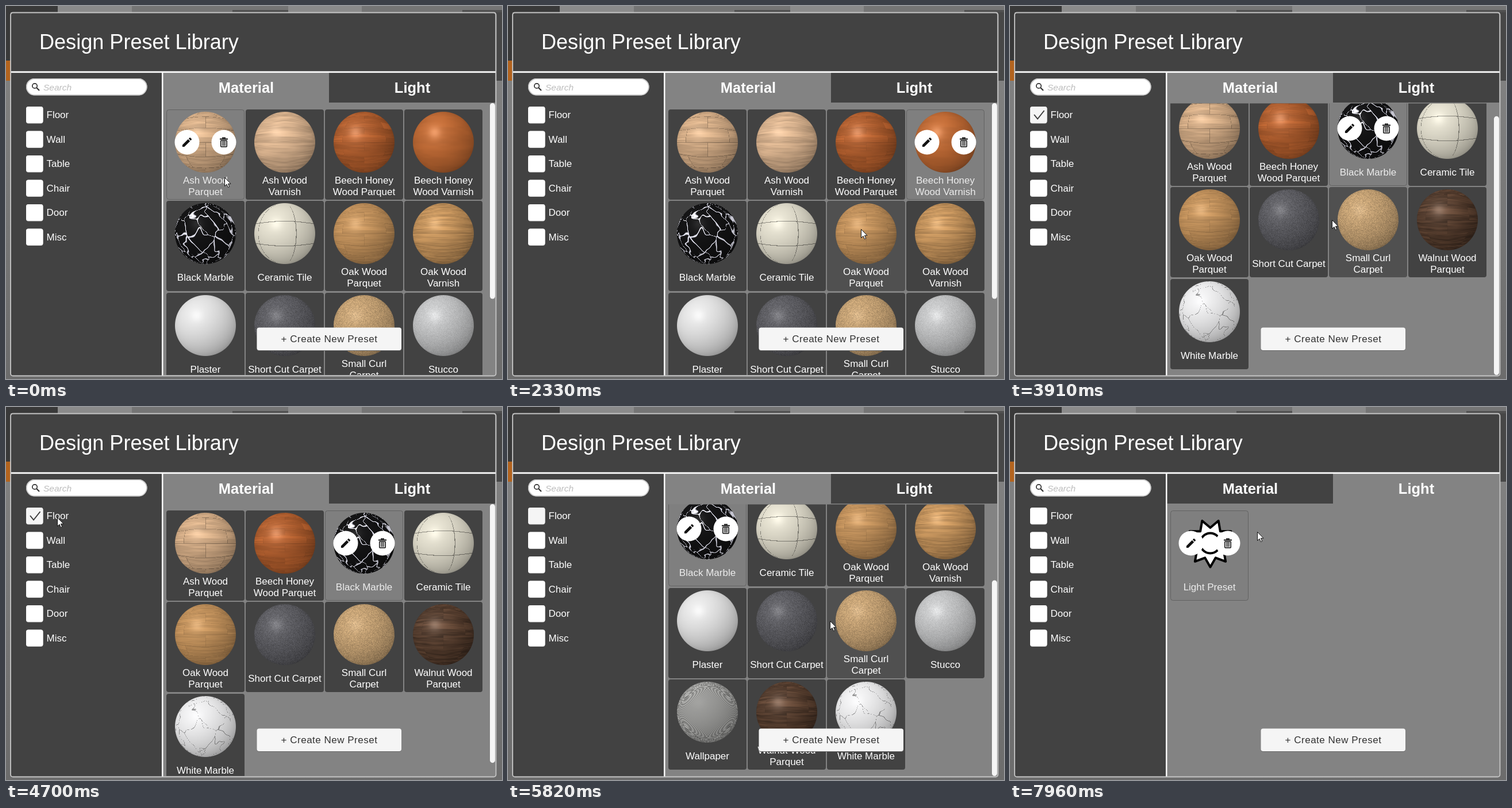
An HTML page with a canvas that plays this animation: 863 by 649 pixels, repeating every 8000 ms.

```html
<!DOCTYPE html>
<html lang="en">
<head>
<meta charset="utf-8">
<title>Design Preset Library</title>
<style>
  html, body { margin: 0; width: 100%; height: 100%; overflow: hidden; background: #747474; }
  canvas { display: block; }
</style>
</head>
<body>
<canvas id="stage" width="863" height="649"></canvas>
<script>
const g = document.getElementById('stage').getContext('2d');
const LOOP = 8000, R = 53, DARK = '#424242', HOVER = '#505050', GRAY = '#838383';
const SANS = '"Liberation Sans", Arial, sans-serif';
const clamp = (v, a = 0, b = 1) => Math.min(b, Math.max(a, v));
const mix = (a, b, f) => a + (b - a) * f;
const ramp = (t, from, to) => clamp((t - from) / (to - from));

// ---- procedural textures: brightness at longitude u, latitude v ----
const hash = (x, y) => { const s = Math.sin(x * 127.1 + y * 311.7) * 43758.5453; return s - Math.floor(s); };
function noise(x, y) {
  const i = Math.floor(x), j = Math.floor(y), soft = f => f * f * (3 - 2 * f);
  const a = soft(x - i), b = soft(y - j);
  return mix(mix(hash(i, j), hash(i + 1, j), a), mix(hash(i, j + 1), hash(i + 1, j + 1), a), b);
}
const plain = () => 1;
const grain = (amp, freq) => (u, v) =>
  1 + amp * (noise(u + 9, v * freq) - .5) + amp * .6 * (noise(u * 3, v * freq * 2.5) - .5);
const speckle = amp => (u, v, x, y) => 1 + amp * (hash(x, y) - .5);
const weave = (u, v) => 1 + .3 * Math.sin(u * 166) * Math.sin(v * 166);

function planks(base, height, tone, seam) {
  return (u, v) => {
    const row = Math.floor(v / height), along = u / 1.6 + (row & 1) / 2, block = Math.floor(along);
    const gap = Math.min((v / height - row) * height, (along - block) * 1.6);
    return base(u, v + block * 3) * (1 + tone * (hash(row, block) - .5)) * (gap < .02 ? seam : 1);
  };
}

function tiles(u, v) {
  const column = Math.abs(((u + 1.05) % 1.44 + 1.44) % 1.44 - .72);
  return column > .708 || Math.abs(Math.abs(v) - .42) < .012 ? .6 : 1;
}

// Cracks run along the borders between randomly placed cell centres.
function veins(freq, width, gain) {
  return (u, v) => {
    const x = u * freq + .5 * noise(u * 5, v * 5), y = (v - u * .35) * freq + .5 * noise(v * 5, u * 5 + 7);
    let near = 9, next = 9;
    for (let i = Math.floor(x) - 1; i <= x + 1; i++) for (let j = Math.floor(y) - 1; j <= y + 1; j++) {
      const d = Math.hypot(i + hash(i, j) - x, j + hash(j, i + 5) - y);
      if (d < near) { next = near; near = d; } else next = Math.min(next, d);
    }
    return 1 + gain * clamp(1.4 - (next - near) / (width * (.4 + 1.2 * noise(x * 2, y * 2))));
  };
}

function makeBall(hex, texture, gloss) {
  const size = 108, ball = document.createElement('canvas');
  ball.width = ball.height = size;
  const c = ball.getContext('2d'), img = c.createImageData(size, size);
  const rgb = [1, 3, 5].map(i => parseInt(hex.slice(i, i + 2), 16));
  for (let py = 0; py < size; py++) for (let px = 0; px < size; px++) {
    const dx = px + .5 - 54, dy = py + .5 - 54, r = Math.hypot(dx, dy);
    if (r > R + .5) continue;
    const x = clamp(dx / R, -1), y = clamp(dy / R, -1), z = Math.sqrt(Math.max(0, 1 - x * x - y * y));
    const u = Math.atan2(x, z), v = Math.asin(y) * (1 + .3 * x * x);
    const light = .79 + .25 * (-.4 * x - .5 * y + .77 * z);
    const spot = (dx + 15) ** 2 + (dy + 17) ** 2;
    const shine = gloss * (.7 * Math.exp(-spot / 110) + .3 * Math.exp(-spot / 900));
    const k = light * texture(u, v, px, py), at = (py * size + px) * 4;
    rgb.forEach((ch, i) => img.data[at + i] = ch * k + 255 * shine);
    img.data[at + 3] = 255 * clamp(R + .5 - r);
  }
  c.putImageData(img, 0, 0);
  return ball;
}

const material = (label, floor, ...look) => ({ lines: label.split('|'), floor, ball: makeBall(...look) });
const materials = [
  material('Ash Wood|Parquet', true, '#cca681', planks(grain(.16, 16), .5, .06, .75), .1),
  material('Ash Wood|Varnish', false, '#d0ab88', grain(.18, 14), .1),
  material('Beech Honey|Wood Parquet', true, '#aa592a', planks(grain(.12, 16), .26, .16, .95), .24),
  material('Beech Honey|Wood Varnish', false, '#b4622f', grain(.06, 5), .22),
  material('Black Marble', true, '#111112', veins(1.7, .07, 13), .1),
  material('Ceramic Tile', true, '#dad6c6', tiles, .12),
  material('Oak Wood|Parquet', true, '#b98a56', planks(grain(.14, 24), .4, .04, .92), .14),
  material('Oak Wood|Varnish', false, '#ba8b56', grain(.22, 24), .14),
  material('Plaster', false, '#dedede', plain, .08),
  material('Short Cut Carpet', true, '#58585d', speckle(.28), .16),
  material('Small Curl|Carpet', true, '#bd9b6f', speckle(.25), .1),
  material('Stucco', false, '#bcbdbe', speckle(.1), .14),
  material('Wallpaper', false, '#969694', weave, .03),
  material('Walnut Wood|Parquet', true, '#523a2b', planks(grain(.4, 14), .5, .1, .95), .2),
  material('White Marble', true, '#e8e8e9', veins(1.1, .022, -.4), .05)
];
const floorOnly = materials.filter(m => m.floor);
const lightPreset = { lines: ['Light Preset'] };

// ---- timeline ----
const CHECK = 3280, UNCHECK = 4780, LIGHT_TAB = 6510, LIGHT_CLICK = 7600;
const CARD_CLICKS = [1150, 1620, 2000, 2780];
const moves = [ // start, end, x, y
  [40, 80, 377, 292], [820, 1620, 625, 280], [1670, 2000, 765, 290], [2000, 2330, 614, 388],
  [2520, 3120, 53, 198], [3590, 3800, 560, 372], [4320, 4700, 89, 192], [4820, 5120, 560, 372],
  [6050, 6230, 660, 156], [6750, 6930, 497, 320], [6930, 7260, 350, 345], [7450, 7690, 314, 320],
  [7890, 7960, 430, 217]
];
const pointerAt = t => moves.reduce(([px, py], [from, to, x, y]) => {
  const f = ramp(t, from, to);
  return [mix(px, x, f), mix(py, y, f)];
}, [380, 298]);
const scrollAt = t => t >= 5860 ? 0
  : 24 * (ramp(t, 3780, 3910) - ramp(t, 4130, 4180)) + 184 * ramp(t, 5130, 5310);

// ---- drawing helpers ----
function rect(x, y, w, h, fill, r = 0) {
  g.beginPath(); g.roundRect(x, y, w, h, r);
  g.fillStyle = fill; g.fill();
}
function outline(x, y, w, h, color, width, r) {
  g.beginPath(); g.roundRect(x, y, w, h, r);
  g.strokeStyle = color; g.lineWidth = width; g.stroke();
}
function disc(x, y, r, fill) {
  g.beginPath(); g.arc(x, y, r, 0, 7);
  g.fillStyle = fill; g.fill();
}
function text(str, x, y, size, color = '#fff', align = 'left', style = '') {
  g.font = `${style} ${size}px ${SANS}`;
  g.textAlign = align; g.fillStyle = color;
  g.fillText(str, x, y);
}
function line(color, width, ...p) {
  g.beginPath();
  for (let i = 0; i < p.length; i += 2) g.lineTo(p[i], p[i + 1]);
  g.strokeStyle = color; g.lineWidth = width; g.stroke();
}

const pencil = new Path2D('M3 17.25V21h3.75L17.81 9.94l-3.75-3.75zM20.71 7.04a1 1 0 0 0 0-1.41l-2.34-2.34a1 1 0 0 0-1.41 0l-1.83 1.83 3.75 3.75z');
const arrow = new Path2D('M.5.5V15.5L4 12.2 6.3 17.5 8.7 16.5 6.4 11.3H11z');

function editButtons(cx, cy) {
  disc(cx - 32, cy, 21.5, '#fff');
  disc(cx + 32, cy, 21.5, '#fff');
  g.save();
  g.translate(cx - 42.8, cy - 10.8); g.scale(.9, .9);
  g.fillStyle = '#111'; g.fill(pencil);
  g.restore();
  const x = cx + 32;
  rect(x - 7, cy - 6.5, 14, 2, '#111');
  rect(x - 3, cy - 8.5, 6, 2, '#111');
  outline(x - 5.2, cy - 3, 10.4, 11, '#111', 1.6, 1);
  for (const dx of [-2.2, 0, 2.2]) rect(x + dx - .6, cy - 2, 1.2, 8.5, '#111');
}

function sun(cx, cy) {
  g.beginPath();
  for (let i = 0; i < 18; i++) {
    const a = Math.PI / 2 + i * Math.PI / 9, r = i % 2 ? 27 : 41.5;
    g.lineTo(cx + r * Math.cos(a), cy + r * Math.sin(a));
  }
  g.closePath();
  g.fillStyle = '#fff'; g.fill();
  g.strokeStyle = '#000'; g.lineWidth = 4; g.lineJoin = 'round'; g.stroke();
  g.beginPath(); g.arc(cx, cy, 17.5, 0, 7); g.stroke();
}

function card(item, x, y, selected, [mx, my]) {
  const over = mx >= x && mx < x + 136 && my >= y && my < y + 157 && my > 169;
  rect(x, y, 136, 157, selected ? '#7f7f7f' : over ? HOVER : DARK, 4);
  if (selected) outline(x + .5, y + .5, 135, 156, '#626262', 1, 4);
  if (item.ball) g.drawImage(item.ball, x + 14, y + 3);
  else sun(x + 69.5, y + 57);
  if (selected) editButtons(x + 68, y + 57);
  const first = item.lines.length > 1 ? 129 : 139;
  item.lines.forEach((s, i) => text(s, x + 68, y + first + i * 19.5, 17, selected ? '#ececec' : '#fff', 'center'));
}

function backdrop() {
  const shade = g.createLinearGradient(0, 130, 0, 649);
  shade.addColorStop(0, '#808080'); shade.addColorStop(1, '#6c6c6c');
  rect(0, 0, 863, 649, shade);
  rect(0, 0, 863, 11, '#8b8b8b');
  for (const x of [219, 619]) {
    rect(x, 0, 272, 11, '#757575');
    rect(x + 175, 7, 97, 4, '#505050');
  }
  rect(0, 0, 90, 11, '#393939');
  rect(0, 11, 8, 85, '#393939');
  rect(0, 95, 8, 35, '#b3641f');
  rect(852, 11, 11, 119, '#474747');
}

function sidebar(t) {
  rect(35, 126, 210.5, 29.5, '#fff', 15);
  outline(35.8, 126.8, 209, 28, '#c9c9c9', 1.6, 14);
  g.beginPath(); g.arc(50, 139, 4.2, 0, 7);
  g.strokeStyle = '#333'; g.lineWidth = 1.7; g.stroke();
  line('#333', 2.2, 53, 142, 58, 147);
  text('Search', 65, 146.5, 15.5, '#bdbdbd', 'left', 'italic');

  const pressed = (t >= CHECK && t < 3430) || (t >= UNCHECK && t < UNCHECK + 100);
  const focused = t >= CHECK && t < LIGHT_TAB;
  ['Floor', 'Wall', 'Table', 'Chair', 'Door', 'Misc'].forEach((name, i) => {
    const cy = 189.5 + i * 42.5;
    rect(35, cy - 14.5, 29.5, 29.5, '#c4c4c4', 4);
    rect(35, cy - 14.5, 29.5, 28.7, i || !focused ? '#fff' : pressed ? '#dadada' : '#f5f5f5', 4);
    text(name, 70.5, cy + 5.5, 17);
  });
  g.globalAlpha = ramp(t, CHECK - 10, 3450) ** 1.5 * (1 - ramp(t, UNCHECK, UNCHECK + 100));
  line('#3c3c3c', 2, 42, 189, 48, 196.5, 59.5, 182);
  g.globalAlpha = 1;
}

function tab(label, x, active, mouse) {
  const over = mouse[0] >= x && mouse[0] < x + 289 && mouse[1] >= 116 && mouse[1] < 168;
  if (!active) rect(x, 116, 289, 52, over ? HOVER : DARK);
  text(label, x + 145, 151, 25.5, '#fff', 'center', 'bold');
}

function presets(t, mouse) {
  const onLight = t >= LIGHT_TAB;
  const filtered = t >= CHECK + 20 && t < UNCHECK;
  const offset = scrollAt(t);
  const items = onLight ? [lightPreset] : filtered ? floorOnly : materials;
  const chosen = onLight ? t >= LIGHT_CLICK && lightPreset
                         : materials[CARD_CLICKS.filter(c => c <= t).length];
  g.save();
  g.beginPath(); g.rect(274, 169.5, 567, 472.5); g.clip();
  items.forEach((item, i) => {
    const y = Math.floor(180 + 159.5 * Math.floor(i / 4)) - Math.round(offset);
    card(item, 279 + 138 * (i % 4), y, item === chosen, mouse);
  });
  g.restore();
  if (onLight) return;
  const range = filtered ? 24 : 184, thumb = 473 * 473 / (473 + range);
  rect(842, 169 + (473 - thumb) * Math.min(1, offset / range), 9, thumb, '#f5f5f5', 4.5);
}

function draw(t) {
  const mouse = pointerAt(t), onLight = t >= LIGHT_TAB;
  backdrop();
  rect(8, 11, 844.5, 633, GRAY, 4);
  rect(9, 12, 842, 102, DARK, [4, 4, 0, 0]);
  rect(9, 116, 262, 527, DARK);
  text('Design Preset Library', 58, 74.5, 36.1);
  sidebar(t);
  tab('Material', 273, !onLight, mouse);
  tab('Light', 562, onLight, mouse);
  presets(t, mouse);
  rect(9, 113.5, 843, 2.7, '#fff');
  rect(271, 116, 2.5, 527, '#fff');
  outline(8, 11.5, 844.5, 632, '#c4c4c4', 1.8, 4);
  rect(436.5, 560, 251.5, 40, '#6a6a6a', 4);
  rect(436.5, 559.5, 251.5, 39.5, '#f5f5f5', 4);
  g.letterSpacing = '0.5px';
  text('+ Create New Preset', 562.5, 585, 17, '#323232', 'center');
  g.letterSpacing = '0px';

  g.save();
  g.translate(Math.round(mouse[0]), Math.round(mouse[1]));
  g.fillStyle = '#fff'; g.fill(arrow);
  g.strokeStyle = '#111'; g.lineWidth = 1; g.lineJoin = 'miter'; g.stroke(arrow);
  g.restore();
}

const start = performance.now();
function tick() {
  draw((performance.now() - start) % LOOP);
  requestAnimationFrame(tick);
}
tick();
</script>
</body>
</html>
```
